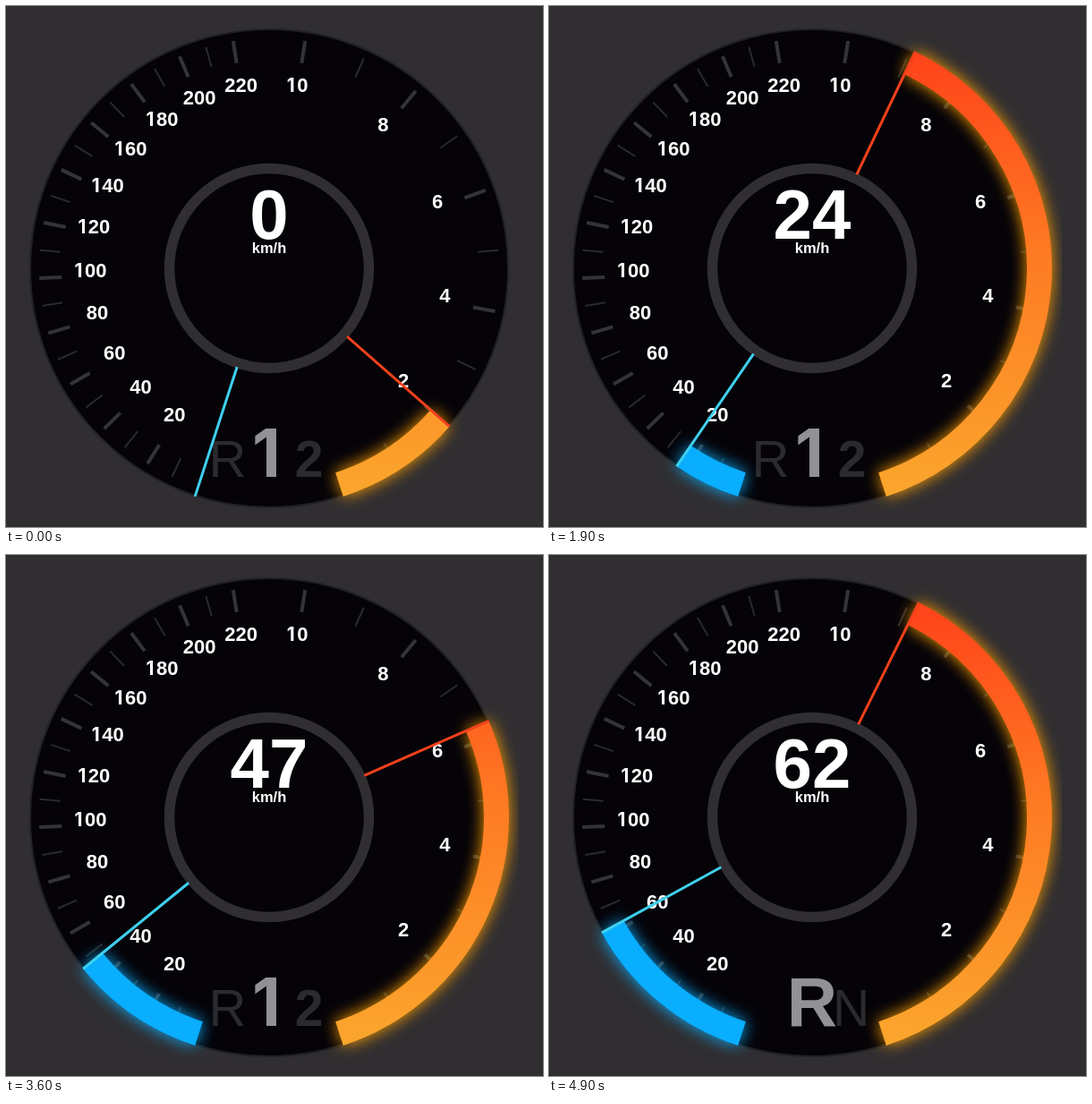
These frames come from a looping animation (600x582 px, 5000 ms). An HTML page:

```html
<!DOCTYPE html>
<html lang="en">
<head>
<meta charset="utf-8">
<title>Speedometer</title>
<style>
  html, body { margin: 0; width: 100%; height: 100%; overflow: hidden; background: #302e31; }
  svg { display: block; width: 100%; height: 100%; }
  text { font-family: "Liberation Sans", Arial, Helvetica, sans-serif; font-weight: 700; text-anchor: middle; fill: #fff; }
  .one { font-family: Inter, Roboto, sans-serif; }
  .gear { fill: #929295; }
  .next { fill: #2b2a2d; }
  .letter { fill: #2b2a2d; font-weight: 400; }
  .major { stroke: #343436; stroke-width: 4; }
  .minor { stroke: #2b2a2d; stroke-width: 2; }
  .arc { fill: none; stroke-width: 28; }
  .needle { stroke-width: 3; }
</style>
</head>
<body>
<svg viewBox="0 0 600 582">
  <defs>
    <linearGradient id="heat" gradientUnits="userSpaceOnUse" x1="0" y1="547" x2="0" y2="50">
      <stop offset="0" stop-color="#fba62d"/>
      <stop offset=".55" stop-color="#fe7a23"/>
      <stop offset="1" stop-color="#ff421a"/>
    </linearGradient>
    <filter id="warm" filterUnits="userSpaceOnUse" x="0" y="0" width="573" height="582" color-interpolation-filters="sRGB">
      <feDropShadow dx="0" dy="0" stdDeviation="9" flood-color="#ffa000"/>
    </filter>
    <filter id="cool" filterUnits="userSpaceOnUse" x="0" y="0" width="573" height="582" color-interpolation-filters="sRGB">
      <feDropShadow dx="0" dy="0" stdDeviation="9" flood-color="#0aaeff"/>
    </filter>
  </defs>
  <rect width="600" height="582" fill="#302e31"/>
  <circle cx="294" cy="293" r="267" fill="#050308" stroke="#222023" stroke-width="2"/>
  <circle cx="294" cy="293" r="111.5" fill="none" stroke="#302e31" stroke-width="11.5"/>
  <g id="ticks"></g>
  <g id="gears"></g>
  <g filter="url(#warm)"><path id="rpmArc" class="arc" stroke="url(#heat)"/></g>
  <g filter="url(#cool)"><path id="speedArc" class="arc" stroke="#0aaeff"/></g>
  <g id="labels"></g>
  <g id="speed"></g>
  <text x="294" y="276" font-size="16.5">km/h</text>
  <line id="speedNeedle" class="needle" stroke="#3fd0ee"/>
  <line id="rpmNeedle" class="needle" stroke="#f2411b"/>
</svg>
<script>
const CX = 294, CY = 293, START = 18, SWEEP = 153, LOOP = 5000;
const $ = id => document.getElementById(id);

// Angles run from straight down; side is -1 for speed (left), 1 for revs (right).
const polar = (side, deg, r) => {
  const a = deg * Math.PI / 180;
  return [CX + side * r * Math.sin(a), CY + r * Math.cos(a)];
};

function add(parent, tag, attrs, content) {
  const el = document.createElementNS("http://www.w3.org/2000/svg", tag);
  for (const k in attrs) el.setAttribute(k, attrs[k]);
  if (content !== undefined) el.textContent = content;
  parent.appendChild(el);
  return el;
}

// Centres tabular characters; the digit 1 uses a face without a foot.
function write(parent, str, cx, y, size, cls = "") {
  const pitch = size * 0.556;
  const text = add(parent, "text", { y, "font-size": size, class: cls });
  [...str].forEach((ch, i) => {
    const one = ch === "1";
    const x = cx + (i - (str.length - 1) / 2) * pitch - (one ? size * 0.04 : 0);
    add(text, "tspan", one ? { x, class: "one " + cls, "font-size": size * 0.946 } : { x }, ch);
  });
}

function setLine(el, side, deg, r1, r2) {
  const [x1, y1] = polar(side, deg, r1), [x2, y2] = polar(side, deg, r2);
  Object.entries({ x1, y1, x2, y2 }).forEach(([k, v]) => el.setAttribute(k, v));
}

function drawScale(side, count, step) {
  for (let i = 1; i <= count; i++) {
    const deg = START + SWEEP * i / count, major = i % 2 === 0;
    const tick = add($("ticks"), "line", { class: major ? "major" : "minor" });
    setLine(tick, side, deg, major ? 232 : 234, 257);
    if (major) {
      const [x, y] = polar(side, deg, 200);
      write($("labels"), String(i * step), x, y + 1, 22);
    }
  }
}

function drawGauge(name, side, part) {
  const deg = START + SWEEP * part;
  const [x1, y1] = polar(side, START, 254), [x2, y2] = polar(side, deg, 254);
  $(name + "Arc").setAttribute("d", part > 0.002
    ? `M${x1} ${y1}A254 254 0 0 ${side < 0 ? 1 : 0} ${x2} ${y2}` : "");
  setLine($(name + "Needle"), side, deg, 116, 268);
}

const speedKeys = [[0, 0], [770, 0], [1300, 11], [2500, 36.1], [2600, 37.4], [3000, 39.3],
  [3100, 40], [3300, 41.2], [3600, 47.2], [4000, 57.3], [4200, 61.2], [4300, 62.2]];
const rpmKeys = [[0, 2.01], [300, 2.1], [600, 2.66], [700, 3.6], [1150, 8.96], [2500, 8.86],
  [2600, 8.4], [3000, 5.55], [3100, 4.93], [3200, 4.7], [3600, 6.25], [4000, 7.9], [4260, 8.94]];

function sample(keys, t) {
  const i = keys.findIndex(k => k[0] > t);
  if (i < 0) return keys[keys.length - 1][1];
  const [t0, v0] = keys[i - 1], [t1, v1] = keys[i];
  return v0 + (v1 - v0) * (t - t0) / (t1 - t0);
}

// The rev limiter makes the needle sway just under 9.
function rpmAt(t) {
  const limited = (t >= 1150 && t <= 2500) || t >= 4260;
  return limited ? 8.925 - 0.065 * Math.cos((t - 2500) * Math.PI / 400) : sample(rpmKeys, t);
}

function drawGears(shifted) {
  const g = $("gears");
  g.textContent = "";
  if (shifted) {
    write(g, "N", 337.5, 526, 57, "letter");
  } else {
    write(g, "R", 247.5, 526, 58, "letter");
    write(g, "2", 338.5, 526, 57, "next");
  }
  write(g, shifted ? "R" : "1", CX, 526, 78, "gear");
}

let shownSpeed, shownGear;
function draw(t) {
  const speed = sample(speedKeys, t), shifted = t >= 4900, value = String(Math.round(speed));
  drawGauge("speed", -1, speed / 220);
  drawGauge("rpm", 1, rpmAt(t) / 10);
  if (value !== shownSpeed) {
    $("speed").textContent = "";
    write($("speed"), value, CX, 260, 78);
    shownSpeed = value;
  }
  if (shifted !== shownGear) {
    drawGears(shifted);
    shownGear = shifted;
  }
}

drawScale(-1, 22, 10);
drawScale(1, 10, 1);
const begin = performance.now();
function frame() {
  draw((performance.now() - begin) % LOOP);
  requestAnimationFrame(frame);
}
frame();
</script>
</body>
</html>
```
